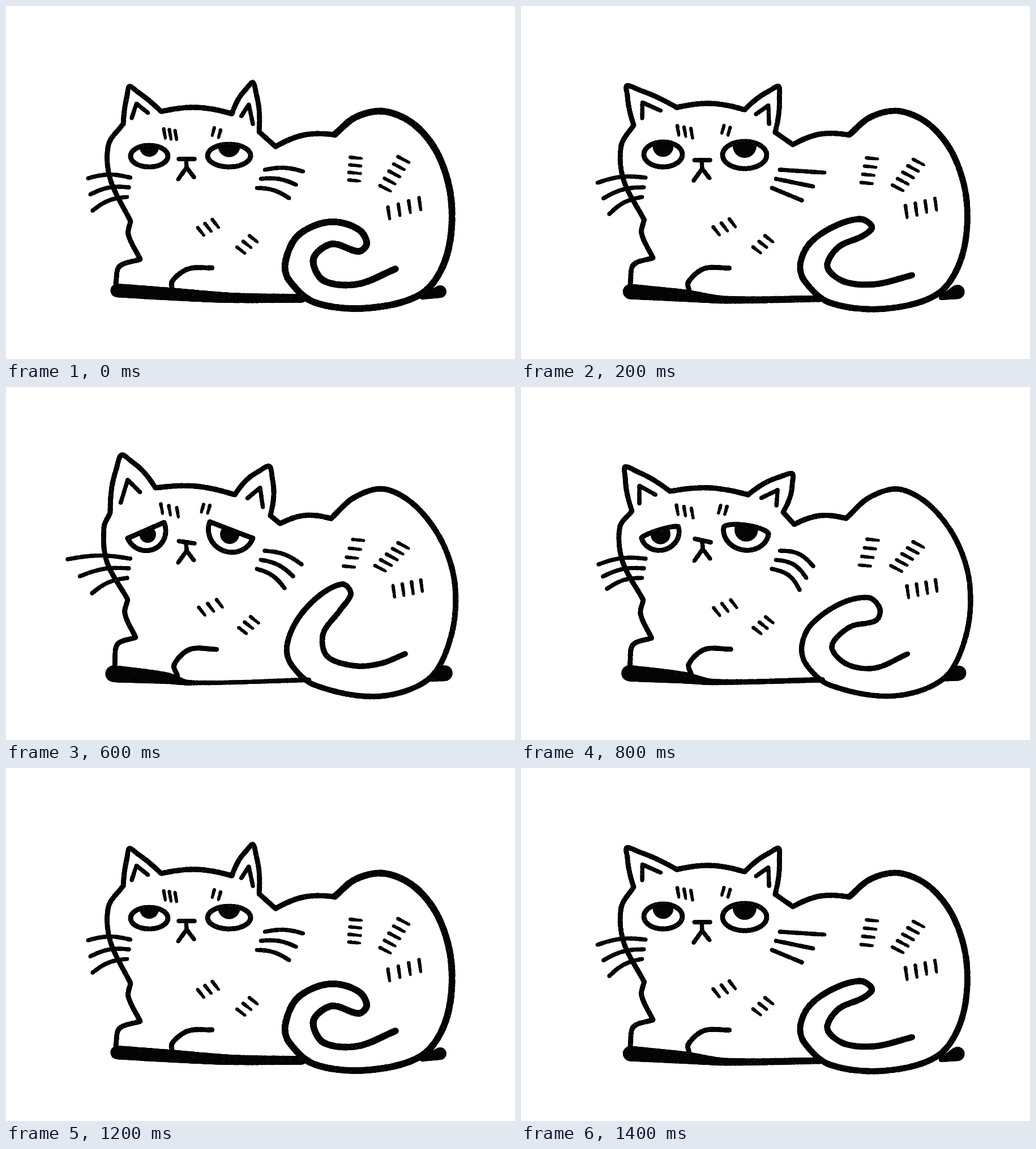
These frames come from a looping animation (899x623 px, 1.6 s). An HTML page with a canvas:

```html
<!DOCTYPE html>
<html lang="en">
<head>
<meta charset="utf-8">
<title>Grumpy cat</title>
<style>
  html, body { margin: 0; width: 100%; height: 100%; overflow: hidden; background: #fff; }
  canvas { display: block; width: 100%; height: 100%; }
</style>
</head>
<body>
<canvas id="stage" width="899" height="623"></canvas>
<script>
const W = 899, H = 623, STEP = 200;

// lean and sag blend the body from sitting up (0) to slumped (1).
// ears: outer or inner base, tip, other base, puff. eyes: lid ends, bulge above, bulge below.
// whiskers: first and last tip, left then right.
const upward = {
  lean: 0, sag: 0, weight: 11.5,
  ears: [[207, 208, 218, 142, 274, 186, 2], [399, 190, 436, 135, 447, 222, 5]],
  eyes: [[220, 265, 286, 265, 19, 19], [356, 264, 432, 264, 20, 20]],
  pupil: { drop: 3, size: 0.26 },
  nose: [319, 270, 0],
  whiskers: [145, 304, 153, 361, 525, 292, 500, 339], bend: 5,
  tail: [512, 409, 552, 385, 590, 382, 626, 397, 637, 420, 623, 433, 575, 420, 543, 446, 560, 484, 620, 491, 688, 464]
};
const glance = {
  lean: 0.5, sag: 0.1, weight: 10.5,
  ears: [[199, 210, 187, 141, 275, 179, 3], [395, 183, 455, 142, 449, 223, 4]],
  eyes: [[217, 262, 285, 262, 22, 22], [356, 263, 434, 263, 24, 24]],
  pupil: { drop: 8, size: 0.27 },
  nose: [320, 272, 0],
  whiskers: [135, 312, 156, 367, 536, 294, 496, 343], bend: 0,
  tail: [510, 419, 553, 389, 600, 376, 620, 390, 605, 405, 560, 426, 541, 460, 570, 486, 625, 491, 691, 475]
};
const bored = {
  lean: 0.8, sag: 0.95, weight: 9,
  ears: [[196, 219, 184, 141, 263, 184, 4], [401, 190, 479, 153, 463, 221, 6]],
  eyes: [[213, 267, 278, 247, 5, 31], [358, 248, 437, 260, 10, 34]],
  pupil: { drop: 8, size: 0.26 },
  nose: [321, 271, 3],
  whiskers: [137, 313, 152, 356, 516, 316, 492, 358], bend: 9,
  tail: [512, 420, 565, 382, 615, 372, 634, 392, 627, 412, 580, 424, 549, 458, 575, 489, 625, 496, 683, 471]
};
const sulk = {
  lean: 1, sag: 1, weight: 9.5,
  ears: [[184, 222, 204, 120, 264, 178, 6], [404, 190, 465, 140, 467, 227, 7]],
  eyes: [[215, 267, 279, 239, 0, 36], [360, 238, 436, 267, 0, 39]],
  pupil: { drop: 8, size: 0.21 },
  nose: [319, 274, 2],
  whiskers: [109, 304, 152, 364, 522, 313, 492, 355], bend: 6,
  tail: [515, 410, 555, 367, 595, 348, 609, 365, 590, 394, 560, 436, 567, 475, 615, 492, 662, 488, 705, 471]
};

// Fur marks: count, direction, then first and last centre sitting up and slumped.
const MARKS = [
  [3, [3, 17], [280, 225, 300, 228], [275, 215, 303, 221]],
  [2, [-4, 14], [366, 222, 377, 226], [347, 214, 358, 216]],
  [4, [20, 2], [618, 268, 615, 308], [622, 270, 606, 317]],
  [5, [19, 10], [702, 271, 670, 322], [702, 280, 661, 320]],
  [4, [3, 21], [676, 365, 731, 349], [685, 361, 734, 351]],
  [3, [11, 14], [344, 398, 370, 384], [346, 396, 377, 382]],
  [3, [14, 11], [415, 431, 437, 411], [418, 430, 439, 411]]
];

function seeded(seed) {
  return () => (seed = (seed * 16807) % 2147483647) / 2147483647;
}

const mix = (a, b, t) => a.map((v, i) => v + (b[i] - v) * t);
const dist = (a, b) => Math.hypot(a[0] - b[0], a[1] - b[1]);

function points(flat, size = 2) {
  return Array.from({ length: flat.length / size }, (_, i) => flat.slice(i * size, i * size + size));
}

// Point at fraction t of the line a-b, pushed out to its left by off.
function beside(a, b, t, off) {
  const len = dist(a, b), [x, y] = mix(a, b, t);
  return [x + (b[1] - a[1]) / len * off, y - (b[0] - a[0]) / len * off];
}

function arc(a, b, bulge) {
  return [0, 0.25, 0.5, 0.75, 1].map(t => beside(a, b, t, bulge * Math.sin(t * Math.PI)));
}

// Smooth curve through the points, sampled about once per pixel.
function smooth(pts) {
  const n = pts.length, out = [];
  const slope = (i, k) => {
    const a = pts[Math.max(0, i - 1)], b = pts[i], c = pts[Math.min(n - 1, i + 1)];
    return (c[k] - a[k]) / (dist(a, b) + dist(b, c));
  };
  for (let i = 0; i < n - 1; i++) {
    const a = pts[i], b = pts[i + 1], len = dist(a, b), steps = Math.ceil(len);
    for (let s = 0; s <= steps; s++) {
      const t = s / steps, u = 1 - t;
      out.push(a.map((v, k) => {
        const c1 = v + slope(i, k) * len / 3, c2 = b[k] - slope(i + 1, k) * len / 3;
        return u * u * u * v + 3 * u * u * t * c1 + 3 * u * t * t * c2 + t * t * t * b[k];
      }));
    }
  }
  return out;
}

function render(pose, seed) {
  const sheet = document.createElement('canvas');
  sheet.width = W;
  sheet.height = H;
  const g = sheet.getContext('2d'), rnd = seeded(seed), specks = [];
  g.fillStyle = '#fff';
  g.fillRect(0, 0, W, H);
  g.fillStyle = '#050505';

  const lean = (a, b) => mix(a, b, pose.lean);
  const dot = (x, y, r) => {
    g.beginPath();
    g.arc(x, y, r, 0, 7);
    g.fill();
  };
  // Crayon line: overlapping dots with a grainy edge; a third coordinate is a radius.
  const crayon = (path, w) => path.forEach(([x, y, r = w / 2]) => {
    dot(x, y, r - 0.4 + rnd() * 0.7);
    const a = rnd() * 7;
    dot(x + Math.cos(a) * r, y + Math.sin(a) * r, 0.6);
    if (rnd() < 0.06) specks.push([x + (rnd() - 0.5) * 2 * r, y + (rnd() - 0.5) * 2 * r]);
  });
  const line = (pts, w = 8.5) => crayon(smooth(pts), w);

  function ear([ax, ay, tx, ty, bx, by, puff], outerFirst) {
    const a = [ax, ay], tip = [tx, ty], b = [bx, by];
    line([...arc(a, tip, puff), ...arc(tip, b, puff).slice(1)]);
    const mid = mix(a, b, 0.5);
    const inner = (t, rise) => mix(a, b, t).map((v, k) => v + (tip[k] - mid[k]) * rise);
    const peak = inner(0.5, 0.45), feet = outerFirst ? [0.25, 0.68] : [0.32, 0.75];
    feet.forEach(t => line([inner(t, 0.08), peak], 7));
  }

  function eye([ax, ay, bx, by, up, down]) {
    const a = [ax, ay], b = [bx, by], rim = [];
    for (let i = 0; i <= 200; i++) {
      const s = Math.sin(i * Math.PI / 100);
      rim.push(beside(a, b, (1 + Math.cos(i * Math.PI / 100)) / 2, s * (s > 0 ? up : down)));
    }
    g.save();
    g.beginPath();
    rim.forEach(p => g.lineTo(...p));
    g.clip();
    dot(...beside(a, b, 0.5, up - pose.pupil.drop), dist(a, b) * pose.pupil.size);
    g.restore();
    line(rim, 8);
  }

  function nose([x, y, tilt]) {
    const fork = [x, y + 15];
    line([[x - 14, y - tilt], [x + 14, y + tilt]], 7.5);
    line([[x - 1, y], fork], 7);
    line([[x - 15, y + 36], fork], 7);
    line([fork, [x + 13, y + 32]], 7);
  }

  function fan(tips, roots, bend) {
    for (let i = 0; i < 3; i++) {
      const [tx, ty, rx, ry] = mix([...tips.slice(0, 2), ...roots.slice(0, 2)],
        [...tips.slice(2), ...roots.slice(2)], i / 2);
      const path = tx < rx ? arc([tx, ty], [rx, ry], bend) : arc([rx, ry], [tx, ty], bend);
      line(path, 7);
    }
  }

  // Ground shadow, thinning into the belly line, and the hind foot.
  line(points(lean([196, 502, 12, 300, 509, 11, 400, 515, 9, 523, 516, 7.5],
    [190, 506, 15, 285, 514, 10, 325, 522, 4.5, 535, 517, 4]), 3));
  line(points(lean([735, 514, 4, 767, 504, 11], [748, 516, 4, 775, 505, 14]), 3));

  const [left, right] = pose.ears;
  ear(left, true);
  ear(right, false);
  line(arc(left.slice(4, 6), right.slice(0, 2), 9), 9);

  const chin = lean([220, 380], [215, 375]), elbow = lean([237, 447], [229, 442]);
  line([left.slice(0, 2), ...points(lean([181, 245, 184, 305], [173, 248, 178, 308])), chin]);
  line([chin, lean([216, 403], [210, 400]), elbow]);
  line([elbow, ...points(lean([200, 460, 194, 490], [197, 454, 192, 490]))]);
  line(points(lean([293, 502, 294, 485, 322, 464, 364, 462], [303, 510, 297, 490, 325, 463, 372, 463])));

  const rump = points(mix(
    [580, 227, 618, 196, 668, 186, 722, 210, 765, 266, 787, 350, 777, 445, 735, 507, 640, 533, 545, 523, 500, 484, 493, 455],
    [574, 232, 615, 195, 667, 180, 722, 209, 770, 273, 793, 350, 786, 440, 747, 515, 657, 546, 545, 526, 504, 490, 496, 458],
    pose.sag));
  const nape = lean([476, 248], [484, 241]);
  line([right.slice(4, 6), nape]);
  line(arc(nape, rump[0], 10), 9);
  line([...rump, ...points(pose.tail)], pose.weight);

  pose.eyes.forEach(eye);
  nose(pose.nose);
  fan(pose.whiskers.slice(0, 4), [220, 303, 214, 337], 6);
  fan(pose.whiskers.slice(4), [457, 289, 443, 321], pose.bend);

  MARKS.forEach(([n, [dx, dy], up, slumped]) => {
    const ends = lean(up, slumped);
    for (let i = 0; i < n; i++) {
      const [x, y] = mix(ends.slice(0, 2), ends.slice(2), i / (n - 1));
      line([[x - dx / 2, y - dy / 2, 3], [x + dx / 2, y + dy / 2, 2.4]]);
    }
  });

  g.fillStyle = 'rgba(255,255,255,0.6)';
  specks.forEach(([x, y]) => dot(x, y, 0.5));
  return sheet;
}

const [a, b, c, d] = [upward, glance, bored, sulk].map((pose, i) => render(pose, 71 + i * 997));
const order = [a, b, c, d, c, b, a, b];
const ctx = document.getElementById('stage').getContext('2d');
const start = performance.now();

function draw(now) {
  const i = Math.floor(Math.max(0, now - start) / STEP) % order.length;
  ctx.drawImage(order[i], 0, 0);
  requestAnimationFrame(draw);
}
draw(start);
</script>
</body>
</html>
```
